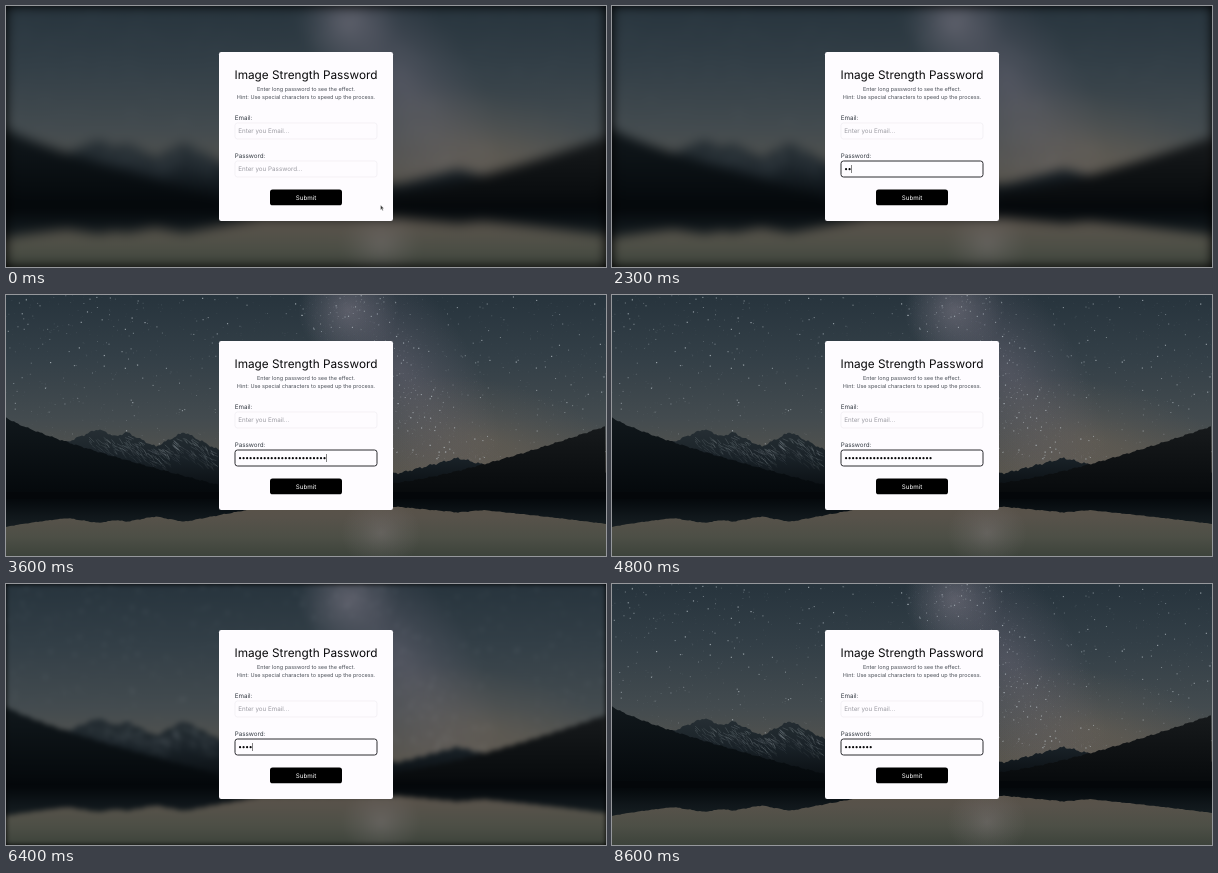
These frames come from a looping animation (600 px wide and 261 px high, 9.1 s). An HTML page with a canvas:

```html
<!DOCTYPE html>
<html lang="en">
<head>
<meta charset="utf-8">
<title>Image Strength Password</title>
<style>
  html, body { margin: 0; width: 100%; height: 100%; overflow: hidden; background: #000; }
  canvas, svg { position: absolute; left: 0; top: 0; width: 600px; height: 261px; }
  text { font: 6.25px Inter, sans-serif; fill: #333a42; text-rendering: geometricPrecision; }
  .mid { text-anchor: middle; }
  .title { font-size: 11.8px; fill: #0a0a0c; }
  .hint { font-size: 5.47px; fill: #4b5058; }
  .soft { fill: #9b9ba2; }
  .field { fill: #fefcff; stroke: #eceaee; stroke-width: .6; }
  .field.focus { stroke: #2c2c31; stroke-width: 1; }
</style>
</head>
<body>
<canvas id="photo" width="600" height="261"></canvas>
<svg viewBox="0 0 600 261">
  <rect x="213" y="46" width="174" height="169" rx="2.2" fill="#fefcff"/>
  <text class="mid title" x="300" y="73.3">Image Strength Password</text>
  <text class="mid hint" x="300" y="85">Enter long password to see the effect.</text>
  <text class="mid hint" x="300" y="93">Hint: Use special characters to speed up the process.</text>
  <text x="228.7" y="114.3">Email:</text>
  <rect class="field" x="229" y="117" width="142" height="16" rx="2.5"/>
  <text class="soft" x="232.3" y="127.3">Enter you Email...</text>
  <text x="228.7" y="152.3">Password:</text>
  <rect class="field" id="password" x="229" y="155" width="142" height="16" rx="2.5"/>
  <text class="soft" id="prompt" x="232.3" y="165.3">Enter you Password...</text>
  <g id="dots" fill="#08080a"></g>
  <rect id="caret" y="159" width=".6" height="8" fill="#333"/>
  <rect x="264" y="183.5" width="72" height="15.8" rx="2.6" fill="#000"/>
  <text class="mid" x="300" y="193.7" style="fill:#fff">Submit</text>
  <path id="cursor" d="M0 0V4.9L1.2 3.9L2 5.7L2.8 5.3L2 3.6H3.5Z" fill="#333" stroke="#fff" stroke-width=".4"/>
</svg>
<script>
const LOOP = 9100, MAX_BLUR = 6, STEP = 3.52, LEFT = 232.3, SHORE = 203;
const $ = id => document.getElementById(id);
const photo = $('photo'), g = photo.getContext('2d');
const clamp = v => Math.max(0, Math.min(1, v));

let seed = 11;
const rnd = () => (seed = seed * 16807 % 2147483647) / 2147483647;

function fade(y0, y1, ...stops) {
  const grad = g.createLinearGradient(0, y0, 0, y1);
  stops.forEach((c, i) => grad.addColorStop(i / (stops.length - 1), c));
  return grad;
}

function glow(x, y, rx, ry, turn, rgb, alpha) {
  g.save();
  g.translate(x, y);
  g.rotate(turn);
  g.scale(rx, ry);
  const grad = g.createRadialGradient(0, 0, 0, 0, 0, 1);
  grad.addColorStop(0, `rgba(${rgb},${alpha})`);
  grad.addColorStop(.5, `rgba(${rgb},${alpha * .45})`);
  grad.addColorStop(1, `rgba(${rgb},0)`);
  g.fillStyle = grad;
  g.fillRect(-1, -1, 2, 2);
  g.restore();
}

// Outlines of the land, as heights over x
const rough = x => Math.sin(x * .5) * .8 + Math.sin(x * 1.3 + 1) * .6;
const peak = (x, px, py, slope) => py + slope * Math.abs(x - px);
const far = x => rough(x) + Math.min(178,
  peak(x, 92, 134, .42), peak(x, 120, 137, .5), peak(x, 178, 137, .52), peak(x, 452, 163, .26));
const leftHill = x => 122 + 68 * (x / 213) ** .8 + rough(x) * .6;
const rightHill = x => 188 - 57 * clamp((x - 387) / 213) ** 1.3 + rough(x) * .6;
const skyline = x => Math.min(far(x), leftHill(x), rightHill(x));
const mirror = x => SHORE + (SHORE - skyline(x)) * .36;

function land(height, fill, from = 0, to = 600) {
  g.beginPath();
  g.moveTo(from, SHORE);
  for (let x = from; x <= to; x += 2) g.lineTo(x, height(x));
  g.lineTo(to, SHORE);
  g.fillStyle = fill;
  g.fill();
}

function stars(count) {
  for (let i = 0; i < count; i++) {
    const y = rnd() * 165;
    const x = i % 4 ? rnd() * 600 : 335 + y * .6 + (rnd() + rnd() - 1) * 70;
    const a = rnd() ** 4;
    g.fillStyle = `rgba(205,214,220,${.08 + a * .6})`;
    g.fillRect(x, y, .7 + a * .5, .7 + a * .5);
  }
}

// Streaks of snow and rock below the far peaks
function snow(count) {
  for (let i = 0; i < count; i++) {
    const x = 82 + rnd() * 125, drop = 3 + rnd() * 22;
    const y = far(x) + drop;
    if (y > leftHill(x) - 3) continue;
    g.strokeStyle = `rgba(125,135,140,${.34 * (1 - drop / 30)})`;
    g.beginPath();
    g.moveTo(x, y);
    g.lineTo(x + 2 + rnd() * 5, y + 2 + rnd() * 4);
    g.stroke();
  }
}

function paintPhoto() {
  g.fillStyle = fade(0, 185, '#27343d', '#333f47', '#434b4f', '#5c574e');
  g.fillRect(0, 0, 600, SHORE);
  glow(342, 15, 50, 50, 0, '150,143,155', .4);
  glow(395, 75, 150, 70, 1, '135,122,140', .32);
  glow(480, 145, 140, 60, .2, '130,112,92', .3);
  stars(1800);

  land(far, fade(125, SHORE, '#2a3338', '#192127', '#05090c'));
  snow(260);
  land(leftHill, fade(122, SHORE, '#11181c', '#04080b'), 0, 213);
  land(rightHill, fade(131, SHORE, '#171a1c', '#06090b'), 387, 600);

  // Lake
  g.fillStyle = fade(SHORE, 261, '#5a5248', '#57524a', '#4d4f46', '#3d433b');
  g.fillRect(0, SHORE, 600, 58);
  glow(375, 238, 40, 36, 0, '150,140,145', .3);
  land(mirror, fade(SHORE, 240, '#04080b', '#10171b', '#1b2326'));
  g.fillStyle = '#04070a';
  g.fillRect(0, 197, 600, 7);
}

// Typing bursts: start, time the caret's blink counts from, first and last count.
const bursts = [
  [1100, 1200, 0, 0],
  [2200, 2500, 1, 5], [2700, 2900, 7, 11], [3100, 3600, 13, 25], [4300, 4300, 25, 25],
  [5000, 4800, 0, 0],
  [6100, 6200, 1, 2], [6400, 6400, 4, 4], [6600, 7000, 5, 8],
];

function draw(now) {
  const t = Math.floor(now % LOOP / 100) * 100;
  const focused = t >= bursts[0][0];
  const [start, end, from, to] = bursts.findLast(b => b[0] <= t) || bursts[0];
  const count = Math.round(from + (to - from) * clamp((t - start) / (end - start || 1)));

  // Special characters, used in the second password, count three times.
  const strength = clamp(count * (t >= 5000 ? 3 : 1) / 20);
  photo.style.filter = strength < 1 ? `blur(${MAX_BLUR * (1 - strength)}px)` : 'none';

  $('password').classList.toggle('focus', focused);
  $('prompt').style.display = count ? 'none' : '';
  [...$('dots').children].forEach((dot, i) => dot.style.display = i < count ? '' : 'none');
  $('caret').setAttribute('x', LEFT + count * STEP);
  $('caret').style.display = focused && (t - end) % 1100 < 500 ? '' : 'none';

  const k = clamp((t - 400) / 500), move = k * k * (3 - 2 * k);
  $('cursor').setAttribute('transform', `translate(${374.5 - 60 * move} ${199 - 36 * move})`);
  $('cursor').style.display = focused ? 'none' : '';
}

paintPhoto();
$('dots').innerHTML = Array.from({ length: 25 }, (_, i) =>
  `<circle cx="${LEFT + (i + .5) * STEP}" cy="163.2" r="1.1"/>`).join('');

const origin = performance.now();
function tick() {
  draw(performance.now() - origin);
  requestAnimationFrame(tick);
}
tick();
</script>
</body>
</html>
```
